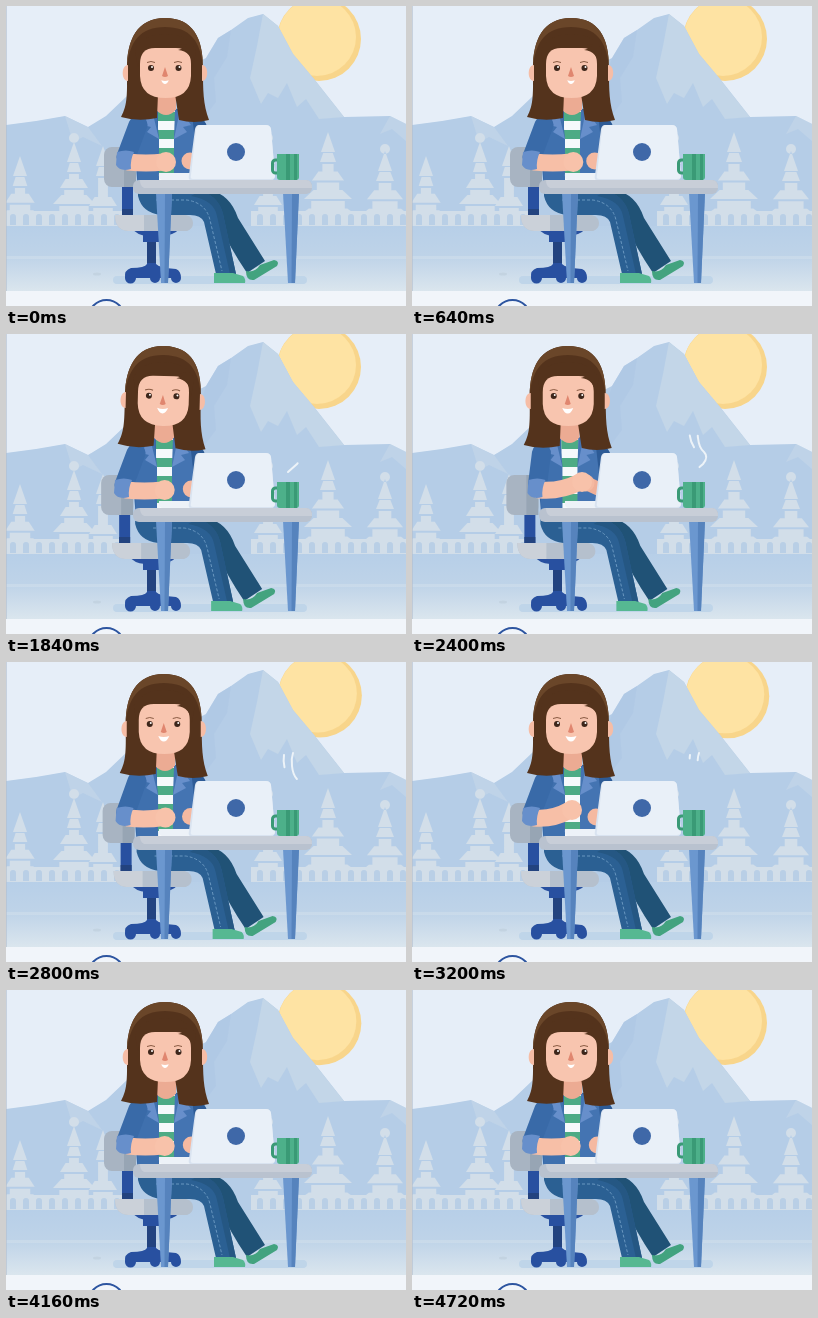
These frames come from a looping animation (400 px wide and 300 px high, 4800 ms). An HTML page:

```html
<!DOCTYPE html>
<html lang="en">
<head>
<meta charset="utf-8">
<title>Working at a desk</title>
<style>
html, body { margin: 0; width: 100%; height: 100%; overflow: hidden; background: #e6eef8; }
svg { display: block; width: 100vw; height: 100vh; }
</style>
</head>
<body>
<svg viewBox="0 0 400 300">
  <defs>
    <linearGradient id="ground" x1="0" y1="0" x2="0" y2="1">
      <stop offset="0" stop-color="#b7cfe8"/>
      <stop offset=".45" stop-color="#bed3e8"/>
      <stop offset="1" stop-color="#dbe6ee"/>
    </linearGradient>
  </defs>

  <rect width="400" height="300" fill="#e6eef8"/>
  <g id="sun">
    <circle cx="313" cy="33" r="42" fill="#f8d58b"/>
    <circle cx="311" cy="31" r="39" fill="#fee3a3"/>
  </g>

  <!-- mountains -->
  <path fill="#b5cde7" d="M0 119L30 115 59 110 82 121 100 110 121 90 160 72 200 52 212 32 225 24 242 12 257 8 272 20 287 48 308 73 338 111 384 110 400 118V226H0Z"/>
  <g fill="#c3d6e8">
    <path d="M257 8L272 20 287 48 308 73 338 111 313 113 300 93 291 101 281 77 272 92 262 87 255 98 244 72 251 40Z"/>
    <path d="M59 110L82 121 96 140 77 131 67 136ZM384 110L400 118V135L386 123 374 128Z" opacity=".7"/>
  </g>
  <path fill="#adc7e4" d="M212 32L225 24 221 51 208 72 210 96 198 112 188 88 200 52Z" opacity=".6"/>

  <path id="village" fill="#d2dee9"/>
  <path id="arches" fill="#b9cfe6"/>

  <rect y="220" width="400" height="66" fill="url(#ground)"/>
  <path fill="#d4e2ee" opacity=".5" d="M0 250H400V253H0Z"/>
  <ellipse cx="91" cy="268" rx="4" ry="1.5" fill="#c3d3e1"/>
  <rect y="285" width="400" height="15" fill="#f1f5fa"/>
  <path stroke="#b4bfce" d="M.5 0V285" opacity=".6"/>
  <circle cx="100.5" cy="312" r="18" fill="none" stroke="#2d55a0" stroke-width="2"/>
  <rect x="107" y="270" width="194" height="8" rx="4" fill="#bfd5e9"/>

  <!-- chair base -->
  <path d="M141 228H150V258Q153 262 170 263Q175 265 175 272A5 5 0 0 1 165 272H154A5 5 0 0 1 144 272H130A5 5 0 0 1 119 272Q118 264 125 262Q139 262 141 258Z" fill="#2850a0"/>
  <path d="M141 236H150V257H141Z" fill="#23437f"/>
  <path d="M137 226H154V236H137Z" fill="#2850a0"/>

  <g id="seat">
    <path d="M116 178H127V212H116Z" fill="#2850a0"/>
    <path d="M116 203H127V211H116Z" fill="#23437f"/>
    <rect x="98" y="141" width="32" height="40" rx="8" fill="#a8b4c2"/>
    <path d="M118 141H130V181H118Z" fill="#97a5b4"/>
    <path d="M126 222H174Q168 230 154 230H142Q130 229 126 222Z" fill="#2850a0"/>
    <path d="M109 209H180Q187 211 187 217T181 225H122Q109 224 109 209Z" fill="#b5c0cd"/>
    <path d="M109 209H138V225H122Q109 224 109 209Z" fill="#cbd1d9"/>
  </g>

  <g id="legs">
    <path d="M186 184H203Q224 188 232 212L259 255 241 267Q224 242 211 214Z" fill="#205276"/>
    <path d="M240 265Q249 267 254 259L268 254Q274 255 271 260L248 274Q240 275 240 265Z" fill="#43a37f"/>
    <path d="M132 184H190Q212 188 217 208L230 268H210L198 216Q195 209 184 209H155Q136 207 132 190Z" fill="#2b6093"/>
    <path d="M194 185Q213 190 217 208L230 268H224L211 210Q208 194 185 190Z" fill="#255783"/>
    <path d="M150 194H181Q200 197 204 214L216 265" fill="none" stroke="#6997c0" stroke-dasharray="3 2"/>
    <path d="M208 267H227L237 270Q240 273 239 277H208Z" fill="#56b892"/>
  </g>

  <g id="body">
    <path d="M134 106Q158 98 185 106Q199 110 202 125L204 184H132L127 125Z" fill="#3768a5"/>
    <path d="M152 101H169V184H152Z" fill="#f5f9fb"/>
    <path d="M160.500 106V184" stroke="#4dab85" stroke-width="17" stroke-dasharray="9"/>
    <path d="M150 88H170V104Q160 114 150 104Z" fill="#ecab93"/>
    <path d="M137 106L150 104 153 132V180H132L130 121Z" fill="#3f70ae"/>
    <path d="M169 104L184 106Q191 111 194 123V180H168V132Z" fill="#4474b2"/>
    <path d="M146 104L153 133 141 126 145 121 137 119ZM174 104L168 133 181 126 177 121 185 119Z" fill="#678fcb"/>
    <path d="M186 108Q201 110 203 129L204 162H192Z" fill="#2d5b96"/>
  </g>

  <g fill="none" stroke-linecap="round">
    <path id="sleeve" stroke="#396aa8" stroke-width="19"/>
    <path id="rightArm" stroke="#f0b098" stroke-width="14"/>
  </g>
  <circle id="rightHand" r="8.500" fill="#f5b9a1"/>

  <g id="head">
    <path d="M159 12C131 12 121 34 121 62C121 87 122 98 115 111Q132 116 151 112L152 88H169L173 114Q188 118 203 114C197 98 197 84 197 62C197 32 187 12 159 12Z" fill="#54331c"/>
    <path d="M121 62C121 34 131 12 159 12C187 12 197 32 197 62C195 35 184 21 159 21C134 21 123 36 121 62Z" fill="#6a4629"/>
    <path d="M122 59C115 59 115 75 122 75ZM196 59C203 59 203 75 196 75Z" fill="#f6bda6"/>
    <path d="M134 58Q134 42 149 42H170Q185 42 185 58V70Q184 92 159.500 92Q135 92 134 70Z" fill="#f8c5af"/>
    <path d="M132 62Q132 46 145 39H175L181 38Q177 43 172 44Q186 45 187 62L190 44Q181 28 159 28Q137 28 129 44Z" fill="#54331c"/>
    <path id="brow" d="M141 56.500Q145 54.500 149 56.500M168 56.500Q172 54.500 176 56.500" fill="none" stroke="#8a5b43"/>
    <g fill="#3d261b"><circle cx="145" cy="62" r="3"/><circle cx="172.500" cy="62" r="3"/></g>
    <g fill="#fff"><circle cx="146" cy="61" r="1"/><circle cx="173.500" cy="61" r="1"/></g>
    <path d="M159 61L162 70Q159 72 156 70Z" fill="#e0866f"/>
    <path id="smile" d="M-5-1Q0 1 5-1Q3 4 0 4T-5-1Z" fill="#fff"/>
  </g>

  <path id="leftArm" fill="none" stroke="#f7bfa7" stroke-width="17" stroke-linecap="round"/>
  <circle id="leftHand" r="10" fill="#f8c2aa"/>
  <path id="cuff" d="M-9-8Q0-11 8-8Q4 0 5 9Q-6 12-10 5Z" fill="#678fcb"/>

  <!-- desk -->
  <g id="deskLeg">
    <path d="M150 187H166L162 277H155Z" fill="#6b97cf"/>
    <path d="M159 187H166L162 277H158.500Z" fill="#5683bd"/>
  </g>
  <use href="#deskLeg" x="127"/>
  <rect x="127" y="174" width="179" height="14" rx="6" fill="#b9c2cf"/>
  <path d="M134 174H300Q306 174 306 182H138Q134 180 134 174Z" fill="#c8ced8"/>
  <path d="M153 167H196V174H157Q152 174 153 167Z" fill="#edf2f8"/>
  <path d="M193 119H260Q264 119 265 123L269 170Q269 174 265 174H184Q182 173 183 169L189 123Q190 119 193 119Z" fill="#d9e3f0"/>
  <path d="M194 119H260Q264 119 265 123L269 170Q269 173 265 173H187Q184 173 185 169L190 123Q191 119 194 119Z" fill="#e9f0f8"/>
  <circle cx="230" cy="146" r="9" fill="#3f68a8"/>

  <!-- mug -->
  <rect x="266.500" y="154" width="9" height="13" rx="3" fill="none" stroke="#3a9a76" stroke-width="3"/>
  <path d="M271 148H293V171Q293 174 290 174H274Q271 174 271 171Z" fill="#4db08a"/>
  <path d="M280 148H284V174H280ZM288 148H291V174H288Z" fill="#3a9a76"/>

  <g fill="none" stroke="#edf3f8" stroke-width="2" stroke-linecap="round">
    <path id="steamA" pathLength="100" d="M282 138L291 130Q297 123 292 118Q287 114 286 104Q285 97 287 91"/>
    <path id="steamB" pathLength="100" d="M284 116Q276 106 278 93"/>
  </g>
</svg>
<script>
const LOOP = 4800, STEP = 80;
const el = id => document.getElementById(id);
const set = (id, name, value) => el(id).setAttribute(name, value);
const move = (id, x, y, extra = "") => set(id, "transform", `translate(${x} ${y}) ${extra}`);

const part = (t, from, to) => Math.max(0, Math.min(1, (t - from) / (to - from)));
const ease = (t, from, to) => (1 - Math.cos(Math.PI * part(t, from, to))) / 2;
// Rises from 0 to 1 and back within the span.
const swell = (t, from, to) => Math.sin(Math.PI * part(t, from, to)) ** 2;

// Spire with stacked roofs that widen towards the ground.
function tower(x, top, half, tiers) {
  let d = `M${x} ${top}L${x + 7} ${top + 20}H${x - 7}Z`;
  const first = top + 20, gap = (220 - first) / tiers;
  for (let i = 0; i < tiers; i++) {
    const w = half * (i + 1) / tiers, y = first + i * gap + 1;
    d += `M${x - w * .6} ${y}H${x + w * .6}L${x + w} ${y + 9}H${x - w}Z`;
    d += `M${x - w * .7} ${y + 11}H${x + w * .7}V${y + gap}H${x - w * .7}Z`;
  }
  return d;
}
const ball = (x, y) => `M${x - 5} ${y}a5 5 0 1 0 10 0a5 5 0 1 0-10 0Z`;
const arch = x => `M${x} 219V211a3 3 0 0 1 6 0V219Z`;

function buildVillage() {
  set("village", "d", tower(14, 150, 22, 3) + tower(68, 136, 28, 4) + tower(97, 140, 14, 2)
    + tower(262, 138, 14, 2) + tower(322, 126, 32, 4) + tower(379, 145, 27, 3)
    + ball(68, 132) + ball(262, 132) + ball(379, 143) + "M0 205H118V220H0ZM245 205H400V220H245Z");
  let d = "";
  for (let x = 4; x < 400; x += 13) if (x < 112 || x > 244) d += arch(x);
  set("arches", "d", d);
}

function steam(id, t, start, end) {
  const head = 100 * part(t, start, end), tail = 100 * part(t, 2250, 3350);
  el(id).style.display = head > tail ? "" : "none";
  set(id, "stroke-dasharray", `${Math.max(0, head - tail)} 200`);
  set(id, "stroke-dashoffset", -tail);
}

function draw(t) {
  const lean = -4 * swell(t, 1200, 3200) - 1.4 * swell(t, 3200, 4000);
  const reach = swell(t, 720, 1680) + swell(t, 1920, 2880);
  const lift = Math.min(1, reach + swell(t, 2880, 3520));
  const type = 1.5 * Math.sin(2 * Math.PI * t / 480) * (1 - lift);
  const warm = swell(t, 2400, 4400);

  move("sun", 2.5 * warm, 1.5 * warm);
  for (const id of ["seat", "legs"]) move(id, lean, 0);
  move("body", lean * .7, 0);
  move("head", lean * .9, 0, `rotate(${1.5 * swell(t, 1440, 2240)} 159 80)`);
  move("smile", 159, 75, `scale(${.75 + .35 * (ease(t, 600, 1200) - ease(t, 3200, 3680))})`);

  const ex = 120 + lean * .7 + 8 * reach, ey = 154;
  const lx = 160 + 10 * reach + type, ly = 156 - 8 * lift;
  const rx = 184 - 10 * reach - type, ry = 155 - 6 * reach;
  move("cuff", ex, ey);
  move("leftHand", lx, ly);
  move("rightHand", rx, ry);
  set("sleeve", "d", `M${132 + lean * .7} 119L${ex} ${ey - 3}`);
  set("leftArm", "d", `M${ex + 2} ${ey + 2}Q${(ex + lx) / 2} ${ey + 4} ${lx - 2} ${ly}`);
  set("rightArm", "d", `M${197 + lean} 158L${rx} ${ry}`);
  steam("steamA", t, 1600, 2600);
  steam("steamB", t, 2100, 2560);
}

function tick(now) {
  draw(Math.floor(now % LOOP / STEP) * STEP);
  requestAnimationFrame(tick);
}
buildVillage();
draw(0);
requestAnimationFrame(tick);
</script>
</body>
</html>
```
